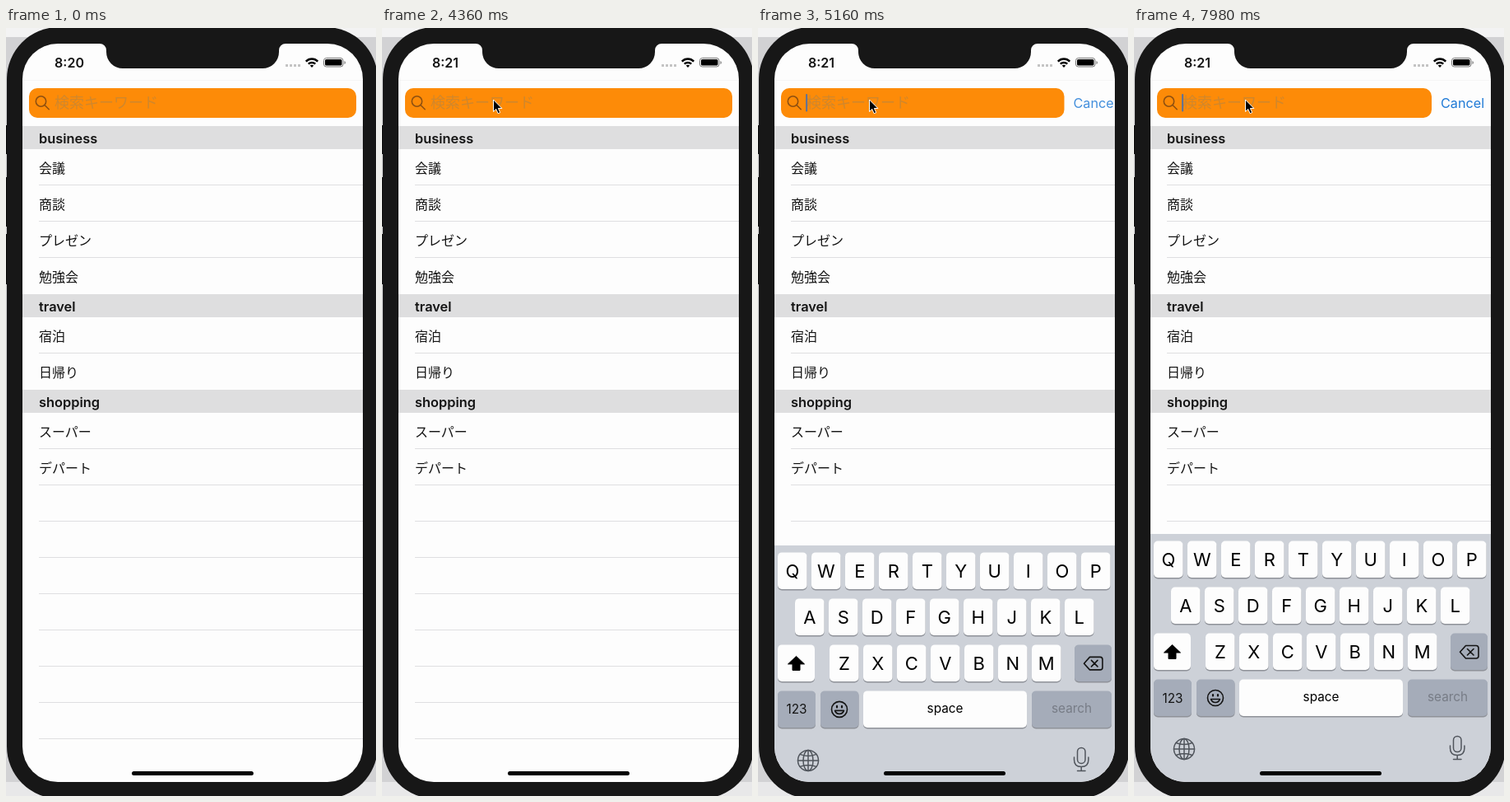
These frames come from a looping animation (450x932 px, 8 s). An HTML page:

```html
<!DOCTYPE html>
<html lang="ja">
<head>
<meta charset="utf-8">
<title>Search bar</title>
<style>
  html, body { margin: 0; width: 100%; height: 100%; overflow: hidden; background: #d4d4d6; }
  svg { display: block; width: 100%; height: 100%; }
  text { font-family: Inter, "Noto Sans CJK JP", "Noto Sans CJK", sans-serif; fill: #141414; }
  .title { font-size: 16.4px; font-weight: 600; }
  .cell { font-size: 16px; }
  .hint { font-size: 18px; fill: #d0872c; }
  .mid { text-anchor: middle; }
  .letter { font-size: 22px; }
  .label { font-size: 15.3px; }
  .line { fill: none; stroke-linecap: round; stroke-linejoin: round; }
</style>
</head>
<body>
<svg viewBox="0 0 450 932" preserveAspectRatio="none">
  <defs>
    <clipPath id="screen"><rect x="20" y="19" width="414" height="896" rx="43"/></clipPath>
  </defs>
  <rect width="450" height="932" fill="#d2d2d4"/>
  <rect width="450" height="11" fill="#f3f3f3"/>
  <rect y="915" width="450" height="17" fill="#e8e8e9"/>
  <path d="M0 118h3v35h-3zM0 181h3v60h-3zM0 250h3v61h-3z" fill="#0a0a0a"/>
  <rect x="1" y="-1" width="451" height="936" rx="63" fill="#171717"/>

  <g clip-path="url(#screen)">
    <rect x="20" y="19" width="414" height="896" fill="#fdfdfd"/>
    <rect x="20" y="63" width="414" height="1" fill="#f5f5f5"/>
    <g id="list"></g>

    <rect id="field" x="28" y="73" width="398" height="36" rx="10" fill="#fd8b08"/>
    <g class="line" stroke="#8f5010" stroke-width="1.6">
      <circle cx="42.5" cy="89" r="6.2"/><path d="M47.2 93.7l5 5"/>
    </g>
    <text class="hint" x="59" y="96.5">検索キーワード</text>
    <rect id="caret" x="58" y="80" width="2.2" height="21.5" rx="1" fill="#66738f"/>
    <text id="cancel" x="373" y="97" font-size="16.2" style="fill:#1f7ad6">Cancel</text>

    <g id="keyboard"></g>
    <rect x="153" y="902" width="148" height="5" rx="2.5" fill="#000"/>

    <path d="M114 18v1a8 8 0 0 1 8 8v2a20 20 0 0 0 20 20h170a20 20 0 0 0 20-20v-2a8 8 0 0 1 8-8v-1z" fill="#171717"/>
    <text id="clock" class="mid" x="77" y="47.5" font-size="16" font-weight="600"></text>
    <path d="M340 45.5h18" stroke="#c4c4c4" stroke-width="3" stroke-dasharray="3 2"/>
    <g fill="none" stroke="#000" stroke-width="2.5">
      <path d="M364.8 40.6a10.2 10.2 0 0 1 14.4 0M367.8 43.7a6 6 0 0 1 8.4 0"/>
      <path d="M372 48l-2.3-2.4q2.3-1.9 4.6 0z" fill="#000" stroke="none"/>
    </g>
    <rect x="386.5" y="36.5" width="23.5" height="10.5" rx="3" fill="none" stroke="#777"/>
    <rect x="388" y="38" width="20.5" height="7.5" rx="1.6" fill="#000"/>
    <path d="M411.5 40v4q1.6-.6 1.6-2t-1.6-2z" fill="#888"/>
  </g>

  <path id="pointer" d="M0 0V14.5L3.3 11.4L5.6 16.7L8.2 15.6L5.9 10.5H10.4Z"
        fill="#000" stroke="#fff" stroke-width="1" stroke-linejoin="round"/>
</svg>

<script>
const LOOP = 8000;
const $ = id => document.getElementById(id);

const box = (x, y, w, h, fill, rx = 0) =>
  `<rect x="${x}" y="${y}" width="${w}" height="${h}" rx="${rx}" fill="${fill}"/>`;
const label = (x, y, cls, str, fill = '') =>
  `<text x="${x}" y="${y}" class="${cls}"${fill && ` style="fill:${fill}"`}>${str}</text>`;

function buildList() {
  const sections = [
    ['business', ['会議', '商談', 'プレゼン', '勉強会']],
    ['travel', ['宿泊', '日帰り']],
    ['shopping', ['スーパー', 'デパート', '', '', '', '', '', '', '']],
  ];
  let y = 119, out = '';
  for (const [title, rows] of sections) {
    out += box(20, y, 414, 28, '#dededf') + label(40, y + 20.5, 'title', title);
    y += 28;
    rows.forEach((row, i) => {
      out += label(40, y + 28.5, 'cell', row);
      y += 44;
      const last = i === rows.length - 1 && row;
      if (!last) out += box(40, y - 1, 394, 1, '#dfdfe1');
    });
  }
  return out;
}

function key(x, y, w, gray) {
  return box(x, y + 1, w, 45, '#8f9299', 5) + box(x, y, w, 44.5, gray ? '#a5acb9' : '#fdfdfd', 5);
}

function buildKeyboard() {
  let out = box(20, 614, 414, 310, '#cdd1d8');
  [['QWERTYUIOP', 24], ['ASDFGHJKL', 45], ['ZXCVBNM', 87]].forEach(([chars, left], row) => {
    const y = 622.5 + row * 56;
    [...chars].forEach((c, i) => {
      const x = left + i * 41;
      out += key(x, y, 35.5) + label(x + 17.8, y + 30.5, 'letter mid', c, '#000');
    });
  });
  out += key(24, 734.5, 45) + key(385, 734.5, 45, true)
    + key(24, 790.5, 46, true) + key(76, 790.5, 46.5, true)
    + key(128, 790.5, 199) + key(333, 790.5, 97, true)
    + label(47, 818.5, 'label mid', '123')
    + label(227.5, 817, 'label mid', 'space', '#000')
    + label(381.5, 817, 'label mid', 'search', '#777c86');
  out += `<path d="M46.5 748.5L56.5 758H51V765.5H42V758H36.5Z" fill="#000" stroke="#000" stroke-linejoin="round"/>
    <g class="line" stroke="#141414" stroke-width="1.6">
      <path d="M403.5 749.5H416q3 0 3 3V762q0 3-3 3H403.5L396.5 757.3ZM405.5 753.5l7.5 7.5M413 753.5l-7.5 7.5"/>
      <circle cx="99" cy="813" r="9.5"/>
      <path d="M93.5 814.5H104.500Q103 818.5 99 818.5T93.5 814.5Z"/>
      <path d="M96 809v1.5M102 809v1.5" stroke-width="2.2"/>
    </g>
    <g class="line" stroke="#50555c" stroke-width="1.5">
      <circle cx="61" cy="875" r="12.5"/><ellipse cx="61" cy="875" rx="6" ry="12.5"/>
      <path d="M61 862.5v25M48.5 875h25M51 867.5q10 4 20 0M51 882.5q10-4 20 0"/>
      <rect x="388.5" y="859.5" width="9.5" height="19" rx="4.7"/>
      <path d="M384.5 871v3q0 8.5 8.7 8.5t8.7-8.5v-3M393.2 882.5v5M388.5 887.5h9.5"/>
    </g>`;
  return out;
}

// Critically damped spring: share of the way still to go.
function remaining(t, start, rate) {
  const x = Math.max(0, t - start) * rate;
  return (1 + x) * Math.exp(-x);
}

// time, x, y
const POINTER = [
  [1300, -12, 238], [1560, 17, 234], [1660, 22.5, 232], [2100, 68, 172],
  [2500, 112, 122], [3000, 140, 103], [3340, 147, 99], [3620, 135.5, 87],
];

function pointerAt(t) {
  const next = POINTER.findIndex(p => p[0] > t);
  if (next === 0) return null;
  if (next < 0) return POINTER[POINTER.length - 1].slice(1);
  const [a, b] = [POINTER[next - 1], POINTER[next]];
  const k = (t - a[0]) / (b[0] - a[0]);
  return [1, 2].map(i => a[i] + (b[i] - a[i]) * k);
}

function caretAlpha(t) {
  if (t < 4780) return 0;
  if (t < 4980) return 0.35 + 0.65 * (t - 4780) / 200;
  if (t < 6000) return 1;
  const phase = t % 1000;
  const fade = 80;
  if (phase < 70 || phase > 500) return 1;
  if (phase < 70 + fade) return 1 - (phase - 70) / fade;
  return Math.max(0, (phase - 500 + fade) / fade);
}

function draw(t) {
  const spot = pointerAt(t);
  $('pointer').style.display = spot ? '' : 'none';
  if (spot) $('pointer').setAttribute('transform', `translate(${spot})`);

  $('clock').textContent = t < 3480 ? '8:20' : '8:21';

  const drop = 301 * remaining(t, 4400, 0.00636);
  $('keyboard').setAttribute('transform', `translate(0 ${drop})`);

  const rest = remaining(t, 4729, 0.00754);
  $('field').setAttribute('width', 334 + 64 * rest);
  $('cancel').setAttribute('x', 373 + 64 * rest);
  $('cancel').setAttribute('opacity', 1 - rest);
  $('caret').setAttribute('opacity', caretAlpha(t));
}

$('list').innerHTML = buildList();
$('keyboard').innerHTML = buildKeyboard();

const begin = performance.now();
function tick() {
  draw((performance.now() - begin) % LOOP);
  requestAnimationFrame(tick);
}
tick();
</script>
</body>
</html>
```
